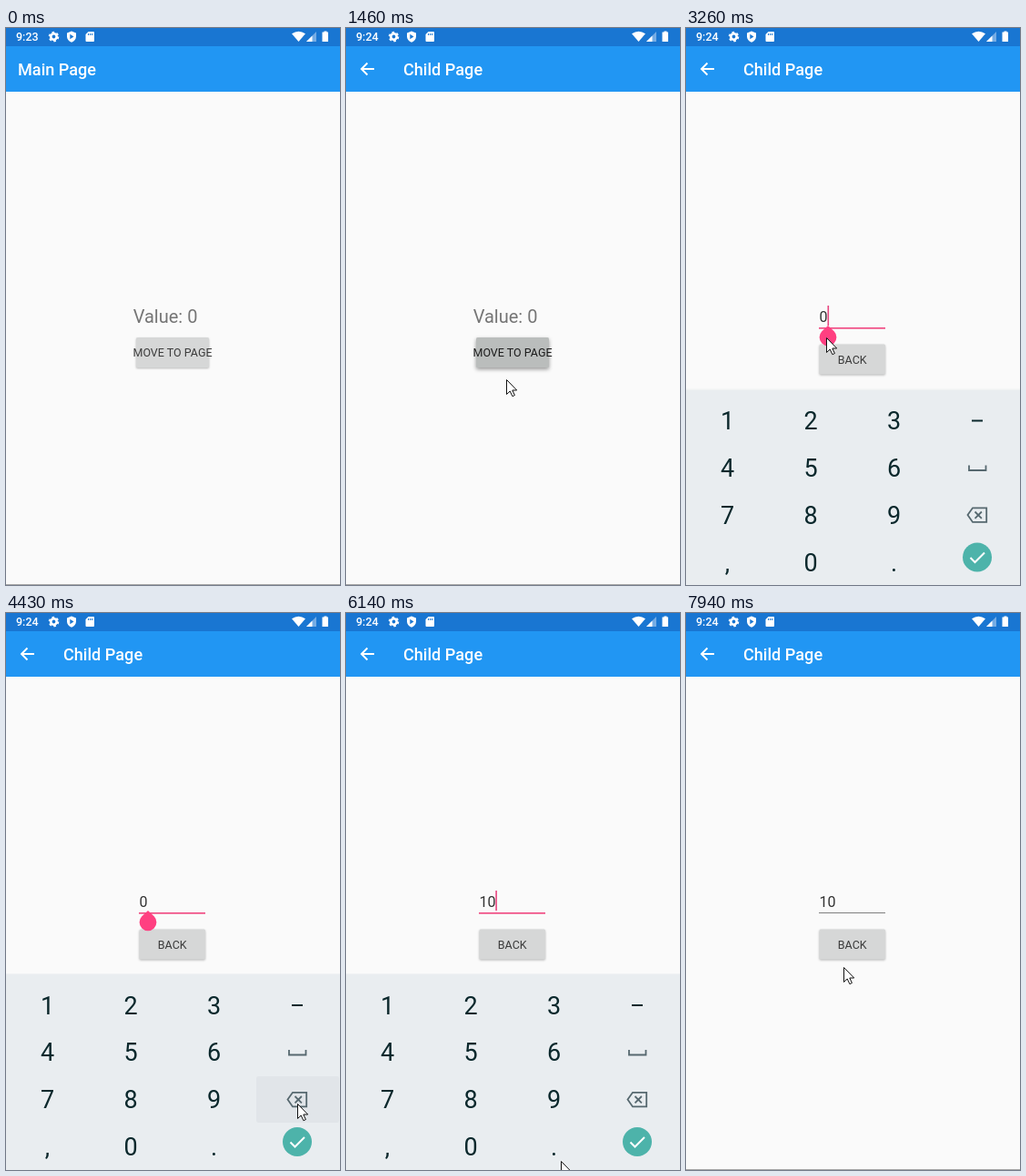
Recreate the animation shown at these times as an HTML page. Size 367 by 612 pixels, loop 8 s.

```html
<!DOCTYPE html>
<html lang="en">
<head>
<meta charset="utf-8">
<title>Page navigation</title>
<style>
  html, body { margin: 0; width: 100%; height: 100%; overflow: hidden; background: #fafafa; }
  svg { display: block; width: 367px; height: 612px; font-family: Roboto, sans-serif; }
  .title { font-size: 18.1px; font-weight: 500; fill: #fff; }
  .caption { font-size: 12.5px; text-anchor: middle; fill: #3c3c3c; }
  .face { fill: #d6d7d7; filter: drop-shadow(0 1px 1px #0004); }
  .pressed .face { fill: #babdbc; filter: drop-shadow(0 2px 2px #0006); }
  .pressed .caption { fill: #1c1c1c; }
  .keys text { font-size: 27px; text-anchor: middle; fill: #0b282c; }
  .glyph { fill: none; stroke: #56686f; stroke-width: 1.8; }
</style>
</head>
<body>
<svg viewBox="0 0 367 612">
  <rect width="367" height="612" fill="#fafafa"/>

  <g id="main">
    <text x="139.7" y="324" font-size="20" fill="#757575">Value: 0</text>
    <g id="move">
      <rect class="face" x="143" y="340" width="80" height="33" rx="1.5"/>
      <text class="caption" x="183" y="361">MOVE TO PAGE</text>
    </g>
  </g>

  <g id="child">
    <text id="value" x="146.5" y="322.5" font-size="16" fill="#333"></text>
    <rect id="underline" x="146" y="329" width="73"/>
    <rect id="caret" y="305" width="1.6" height="22" fill="#e8457f"/>
    <rect class="face" x="146.5" y="347.5" width="72.5" height="33" rx="1.5"/>
    <text class="caption" x="182.7" y="369">BACK</text>
    <path id="handle" d="M156 327l6.7 6.2a9.4 9.4 0 1 1-13.4 0z" fill="#ff4081"/>
  </g>

  <rect y="611" width="367" height="1" fill="#a8a8a8"/>

  <g id="keyboard">
    <rect y="397" width="367" height="215" fill="#e9edf0"/>
    <rect y="396" width="367" height="1" fill="#f1f3f4"/>
    <rect id="highlight" width="91" height="51" rx="2" fill="#dce2e5"/>
    <g class="keys" id="keys"></g>
    <path d="M314 431h12" stroke="#0b282c" stroke-width="2"/>
    <path class="glyph" d="M311 480v5.5h18.500v-5.500"/>
    <path class="glyph" d="M315 526.800h15.200v15.600H315l-5.500-7.800zM317.500 531l7.400 7.400m0-7.400l-7.400 7.400"/>
    <circle cx="320" cy="581" r="16" fill="#4db3aa"/>
    <path d="M312.500 581.500l5 5 10.500-10.500" fill="none" stroke="#fff" stroke-width="2"/>
  </g>

  <rect width="367" height="70" fill="#2196f3"/>
  <rect width="367" height="20" fill="#1976d2"/>
  <text id="clock" x="11" y="14.300" font-size="12.5" font-weight="500" fill="#fff"></text>
  <g fill="#fff">
    <circle cx="52.500" cy="9.500" r="3.200" fill="none" stroke="#fff" stroke-width="2.600"/>
    <circle cx="52.500" cy="9.500" r="4.900" fill="none" stroke="#fff" stroke-width="1.800" stroke-dasharray="2.600 2.530"/>
    <path d="M72 3.500l5 2v3.700c0 3.200-2.100 5.500-5 6.500-2.900-1-5-3.300-5-6.500V5.500z"/>
    <path d="M70.300 6.800l4.200 2.700-4.200 2.700z" fill="#1976d2"/>
    <path d="M90.500 4h5.500q1 0 1 1v9q0 1-1 1h-7.500q-1 0-1-1V7z"/>
    <path d="M90.500 6v2m2-2v2m2-2v2" stroke="#1976d2"/>
    <path d="M314 6.300q7.500-5 15 0L321.500 15z"/>
    <path d="M341 4v11h-11z" opacity=".4"/>
    <path d="M336.500 8.500V15H330z"/>
    <path d="M349.500 3.500h3v1h1.500v10.500h-6.500V4.500h2z"/>
  </g>
  <path id="back" d="M31 45H17.500M23.500 38.500L17 45l6.500 6.500" fill="none" stroke="#fff" stroke-width="1.900"/>
  <text id="title" class="title" y="52"></text>

  <path id="pointer" d="M.5.5v16l3.700-3.500 2.700 5.700 2.500-1.200-2.600-5.500h4.900z" fill="#fff" stroke="#111"/>
</svg>

<script>
const LOOP = 8000, STEP = 78.2;
const ids = ['main', 'move', 'child', 'value', 'underline', 'caret', 'handle', 'keyboard',
  'highlight', 'keys', 'clock', 'back', 'title', 'pointer'];
const el = Object.fromEntries(ids.map(id => [id, document.getElementById(id)]));

['123', '456', '789', ',0.'].forEach((row, r) => [...row].forEach((key, c) => {
  el.keys.insertAdjacentHTML('beforeend',
    `<text x="${45.5 + c * 91.500}" y="${440.5 + r * 51.900}">${key}</text>`);
}));

// Pointer path: [time, x, y]
const path = [
  [200, 196, 572], [520, 188, 440], [900, 170, 358], [1140, 170, 358], [1450, 176, 385],
  [1690, 170, 397], [1990, 170, 397], [2160, 154, 311], [2540, 154, 311], [2630, 144, 311],
  [2780, 144, 311], [3020, 154, 340], [3270, 154, 340], [4030, 319, 537], [4120, 320, 539],
  [4500, 320, 539], [4980, 47, 432], [5330, 47, 432], [5750, 137, 585], [5980, 137, 585],
  [6158, 236, 602], [6310, 283, 583], [6680, 283, 583], [6700, 294, 583], [6840, 294, 583],
  [7090, 316, 572], [7715, 316, 572], [7950, 173, 389]
];
// Edits of the entry: [time, text, caret x]
const edits = [[1500, '0', 146], [2050, '0', 146], [2790, '0', 155.500], [4510, '', 146.500],
  [5300, '1', 155.500], [5910, '10', 164.300]];
// Key presses: [start, end, x, y]
const presses = [[4270, 4510, 275, 509], [5140, 5370, 1, 399], [5760, 5990, 92, 561]];

const clamp = v => Math.max(0, Math.min(1, v));
const show = (node, on) => node.setAttribute('visibility', on ? 'visible' : 'hidden');
const during = (t, from, to) => t >= from && t < to;

function pointerAt(t) {
  const i = path.findIndex(p => p[0] > t);
  if (i < 0) return path.at(-1).slice(1);
  if (i === 0) return path[0].slice(1);
  const [t0, x0, y0] = path[i - 1], [t1, x1, y1] = path[i];
  let k = (t - t0) / (t1 - t0);
  if (t1 - t0 > 400) k = k * k * (3 - 2 * k);
  return [x0 + (x1 - x0) * k, y0 + (y1 - y0) * k].map(Math.round);
}

function render(time) {
  // The screen refreshes in discrete steps.
  const t = Math.floor((time - 38) / STEP) * STEP + 58;
  const onChild = t >= 1300, focused = t < 7710;
  const fade = clamp((t - 1500) / 180);

  el.clock.textContent = t < 590 ? '9:23' : '9:24';
  el.title.textContent = onChild ? 'Child Page' : 'Main Page';
  el.title.setAttribute('x', onChild ? 63 : 13);
  show(el.back, onChild);
  el.main.setAttribute('opacity', 1 - fade);
  el.child.setAttribute('opacity', fade);
  el.move.setAttribute('class', t >= 1070 ? 'pressed' : '');

  const [since, text, caretX] = edits.findLast(e => t >= e[0]) || edits[0];
  el.value.textContent = text;
  el.caret.setAttribute('x', caretX);
  show(el.caret, focused && t >= 2000 && (t - since) % 1000 < 490);
  show(el.handle, during(t, 2790, 4510));
  el.underline.setAttribute('height', focused ? 1.600 : 1);
  el.underline.setAttribute('fill', focused ? '#f0457f' : '#7f7f7f');

  show(el.keyboard, during(t, 3260, 7710));
  el.keyboard.setAttribute('transform', `translate(0 ${t < 3330 ? 0.500 : 0})`);
  const press = presses.find(p => during(t, p[0], p[1]));
  el.highlight.setAttribute('opacity', press ? 0.600 : 0);
  if (press) {
    el.highlight.setAttribute('x', press[2]);
    el.highlight.setAttribute('y', press[3]);
  }

  const [x, y] = pointerAt(t);
  show(el.pointer, t >= 200);
  el.pointer.setAttribute('transform', `translate(${x} ${y})`);
}

const start = performance.now();
function tick() {
  render((performance.now() - start) % LOOP);
  requestAnimationFrame(tick);
}
tick();
</script>
</body>
</html>
```
